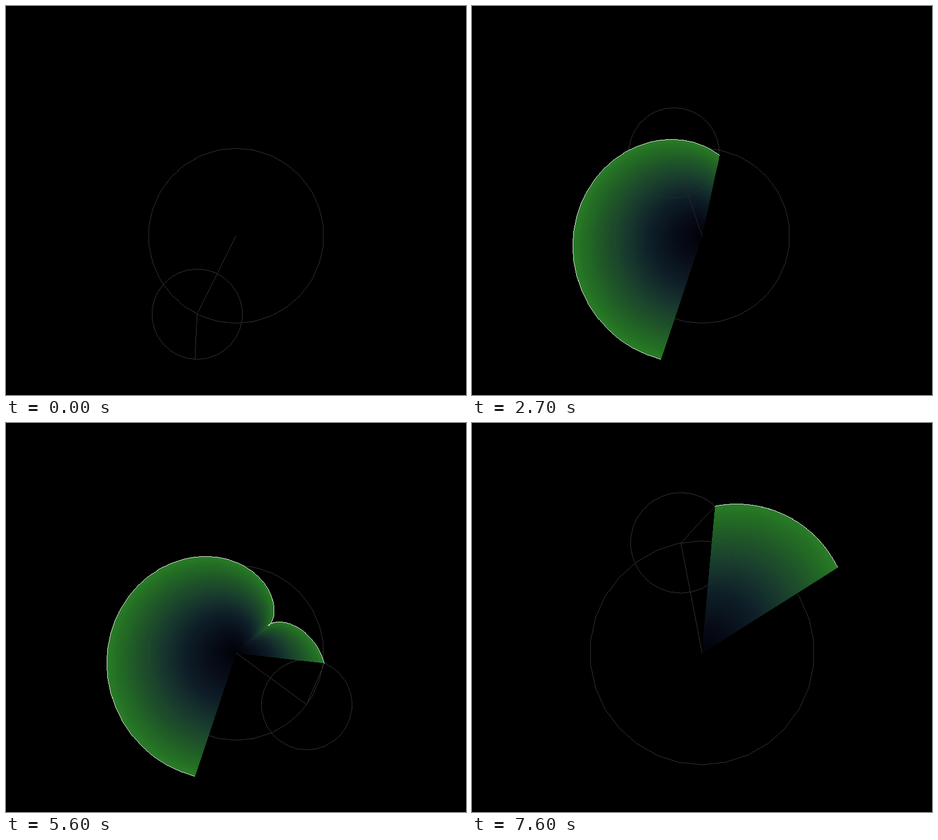
Animation, 813 px wide and 689 px high, one loop 7.7 s. Source, as an HTML page with a canvas:

```html
<!DOCTYPE html>
<html lang="en">
<head>
<meta charset="utf-8">
<title>Epicycles</title>
<style>
  html, body { margin: 0; width: 100%; height: 100%; overflow: hidden; background: #000; }
  canvas { display: block; }
</style>
</head>
<body>
<canvas id="stage" width="813" height="689"></canvas>
<script>
const ctx = document.getElementById('stage').getContext('2d');
const CENTER = { x: 406.7, y: 407 };
const LOOP = 7700, TICK = 100, LAYERS = 160;

// Angles in degrees, speeds in degrees per tick, substeps are curve points per tick.
const CARDIOID = { firstTick: 0, R: 155, r: 80, arm: 116.35, tip: 92.9, armSpeed: 5, tipSpeed: 10, substeps: 1 };
const ARC = { firstTick: 72, R: 198.3, r: 89, arm: 334.3, tip: 313, armSpeed: -18.8, tipSpeed: 0, substeps: 20 };

const SHADES = [
  [0, [2, 2, 9]],
  [0.18, [7, 11, 22]],
  [0.4, [14, 30, 40]],
  [0.6, [25, 59, 46]],
  [0.8, [32, 90, 40]],
  [0.93, [36, 112, 36]],
  [1, [41, 124, 40]]
];

function shade(s) {
  const i = Math.max(1, SHADES.findIndex(([stop]) => stop >= s));
  const [a, from] = SHADES[i - 1], [b, to] = SHADES[i];
  const f = (s - a) / (b - a);
  return `rgb(${from.map((v, c) => Math.round(v + (to[c] - v) * f))})`;
}

function polar(origin, radius, degrees) {
  const a = degrees * Math.PI / 180;
  return { x: origin.x + radius * Math.cos(a), y: origin.y + radius * Math.sin(a) };
}

function pose(fig, ticks) {
  const hub = polar(CENTER, fig.R, fig.arm + fig.armSpeed * ticks);
  return { hub, tip: polar(hub, fig.r, fig.tip + fig.tipSpeed * ticks) };
}

function trace(points) {
  ctx.beginPath();
  points.forEach(p => ctx.lineTo(p.x, p.y));
}

// Hairlines without antialiasing: one whole pixel per step along the longer axis.
function drawLine(points, color) {
  ctx.fillStyle = color;
  for (let i = 1; i < points.length; i++) {
    const a = points[i - 1], dx = points[i].x - a.x, dy = points[i].y - a.y;
    const steps = Math.ceil(Math.max(Math.abs(dx), Math.abs(dy)));
    for (let n = 0; n <= steps; n++) {
      const f = n / steps;
      ctx.fillRect(Math.floor(a.x + dx * f), Math.floor(a.y + dy * f), 1, 1);
    }
  }
}

function ring(origin, radius) {
  return Array.from({ length: 31 }, (_, i) => polar(origin, radius, i * 12 - 90));
}

function drawGuides(fig, { hub, tip }, color) {
  drawLine(ring(CENTER, fig.R), color);
  drawLine(ring(hub, fig.r), color);
  drawLine([CENTER, hub, tip], color);
}

// Shrinking copies of the fan give a gradient from its rim to the center.
function drawFan(curve) {
  for (let i = LAYERS; i > 0; i--) {
    const s = i / LAYERS;
    trace([CENTER, ...curve.map(p => ({
      x: CENTER.x + (p.x - CENTER.x) * s,
      y: CENTER.y + (p.y - CENTER.y) * s
    }))]);
    ctx.fillStyle = shade(s);
    ctx.fill();
  }
}

function draw(tick) {
  const fig = tick > ARC.firstTick ? ARC : CARDIOID;
  const ticks = tick - fig.firstTick;
  const now = pose(fig, ticks);
  const curve = Array.from({ length: ticks * fig.substeps + 1 },
    (_, i) => pose(fig, i / fig.substeps).tip);

  ctx.fillStyle = '#000';
  ctx.fillRect(0, 0, 813, 689);
  drawGuides(fig, now, '#323232');
  if (ticks === 0) return;

  drawFan(curve);
  ctx.globalCompositeOperation = 'lighten';
  drawGuides(fig, now, '#282828');
  ctx.globalCompositeOperation = 'source-over';
  drawLine(curve, '#e0ece0');
}

let shown = -1;
const start = performance.now();
function frame() {
  const tick = Math.floor((performance.now() - start) % LOOP / TICK);
  if (tick !== shown) draw(shown = tick);
  requestAnimationFrame(frame);
}
frame();
</script>
</body>
</html>
```
